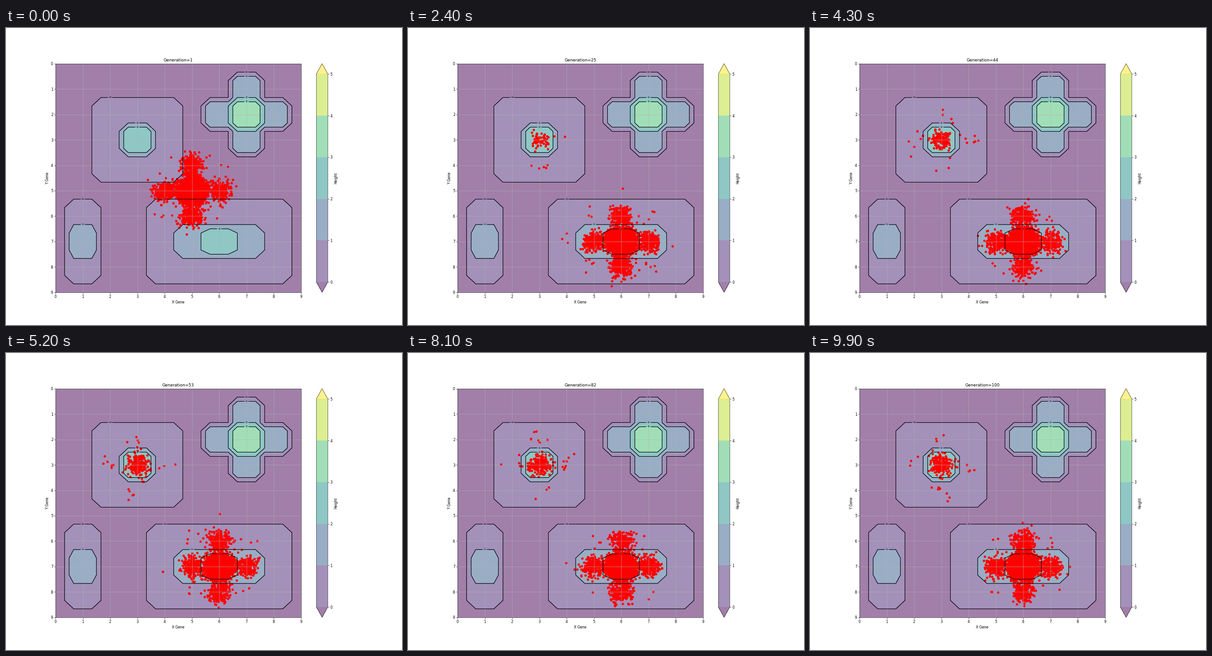
Write a matplotlib script that moves like this. It is 864 by 648 pixels and loops after 10 s.

```python
import numpy as np
import matplotlib.pyplot as plt
from matplotlib.animation import FuncAnimation

GENERATIONS = 100
POPULATION = 10000
STEP = 0.1           # chance to move one cell along one axis
DIAGONAL = 0.001     # chance to move one cell along both axes
LEAP = 0.0002        # chance to move two cells along one axis
JITTER = 0.2


def landscape():
    """Heights on the integer gene grid, indexed [y, x]."""
    z = np.zeros((10, 10))
    z[2:5, 2:5] = 1
    z[3, 3] = 3
    z[1:4, 7] = z[2, 6:9] = 2
    z[2, 7] = 4
    z[6:9, 1] = z[6:9, 4:9] = 1
    z[7, 1] = z[7, 5:8] = 2
    z[7, 6] = 3
    return z


def survivors(gen):
    """Main and minor parent genes, and the share of the minor ones."""
    if gen == 1:
        return (5, 5), (5, 5), 0
    if gen == 2:
        return (5, 6), (4, 4), 0.02
    growth = np.tanh((gen - 43) / 8)
    return (6, 7), (3, 3), (145 + 75 * growth) / POPULATION


def population(gen):
    rng = np.random.default_rng(1000 + gen)
    main, minor, share = survivors(gen)
    genes = np.where(rng.random((POPULATION, 1)) < share, minor, main)

    along_x = rng.random(POPULATION) < 0.5
    sign = rng.choice([-1, 1], genes.shape)
    move = sign * np.column_stack([along_x, ~along_x])
    luck = rng.random((POPULATION, 1))
    genes = genes + np.select(
        [luck < LEAP, luck < LEAP + DIAGONAL, luck < LEAP + DIAGONAL + STEP],
        [2 * move, sign, move], 0)
    return genes + rng.normal(0, JITTER, genes.shape)


fig, ax = plt.subplots(figsize=(16, 12), dpi=54)

axis = np.linspace(0, 9, 28)
cell = np.rint(axis).astype(int)
height = landscape()[np.ix_(cell, cell)]

fill = ax.contourf(axis, axis, height, levels=np.arange(6), extend="both",
                   cmap="viridis", alpha=0.5)
fig.colorbar(fill, ax=ax, label="Height")
lines = ax.contour(axis, axis, height, levels=np.arange(4), colors="black")
ax.set(xlim=(0, 9), ylim=(9, 0), xlabel="X Gene", ylabel="Y Gene",
       xticks=range(10), yticks=range(10))
ax.grid(True)
ax.clabel(lines, fmt="%d", fontsize=8, inline=True, inline_spacing=3)

dots = ax.scatter([], [], s=36, c="red", zorder=1)
title = ax.set_title("Generation=1")


def update(i):
    dots.set_offsets(population(i + 1))
    title.set_text(f"Generation={i + 1}")
    return dots, title


anim = FuncAnimation(fig, update, frames=GENERATIONS, interval=100,
                     repeat=True, repeat_delay=0)
plt.show()
```
